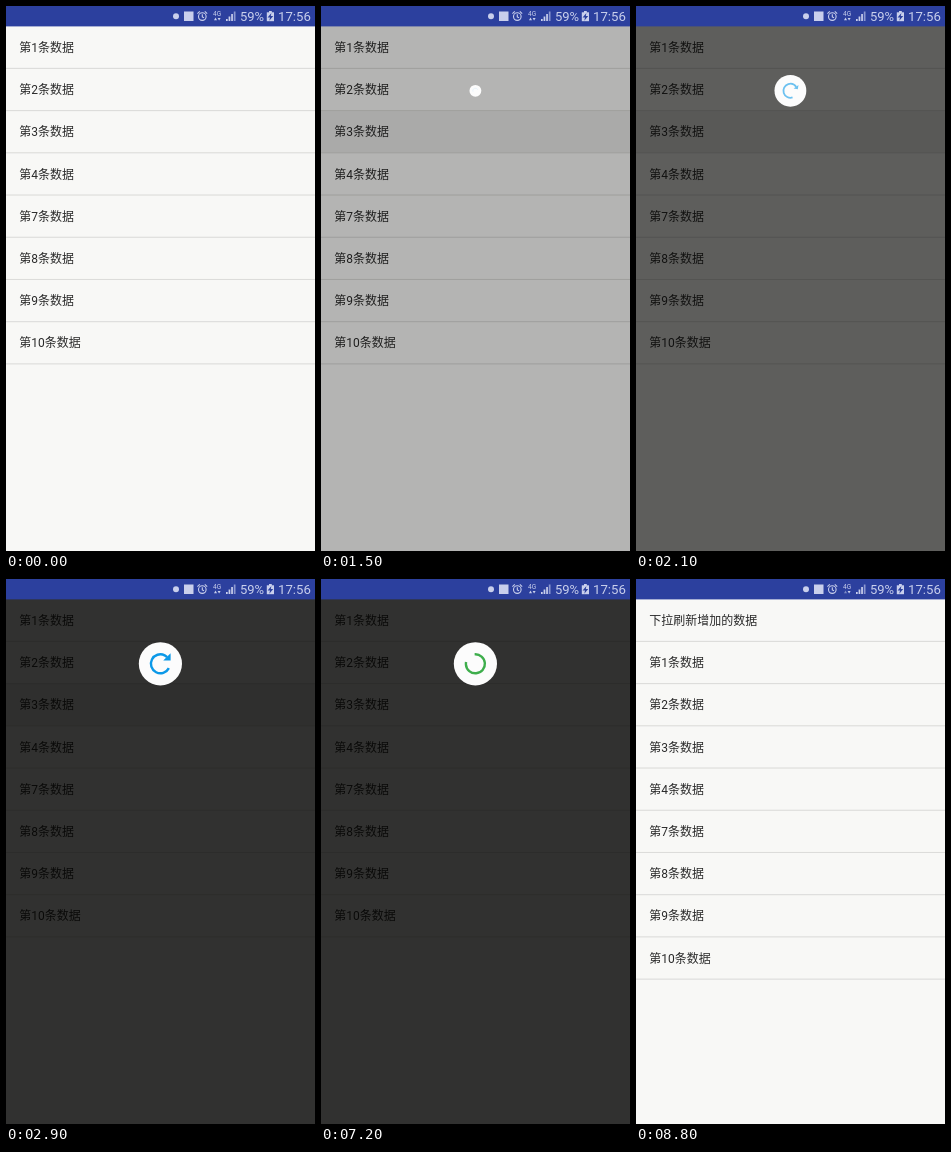
These frames come from a looping animation (309x545 px, 9200 ms). An HTML page with a canvas:

```html
<!DOCTYPE html>
<html lang="zh">
<head>
<meta charset="utf-8">
<style>
html, body { margin: 0; width: 100%; height: 100%; overflow: hidden; background: #f8f8f6; }
canvas { display: block; }
</style>
</head>
<body>
<canvas width="309" height="545"></canvas>
<script>
const ctx = document.querySelector('canvas').getContext('2d');
const LOOP = 9200, STEP = 100;
const BAR = 20.4, ROW = 42.22, TOP_ROW = 20.2;
const CX = 154.4, CY = 84.8, DISC = 21.6, RING = 9.5, STROKE = 2.4;
const SPIN_START = 3372, CYCLE = 1332, DISMISS = 7400, GONE = 8400;
const BLUE = [12, 153, 232], GREEN = [62, 174, 76];
const ICON = '#c9cfec', BAR_COLOR = '#2c409e';
const items = [1, 2, 3, 4, 7, 8, 9, 10].map(n => `第${n}条数据`);
const added = '下拉刷新增加的数据';
// Pull progress: time, amount
const pull = [[1200, 0], [1500, .34], [1700, .525], [2300, .9], [2800, 1]];

const clamp = v => Math.max(0, Math.min(1, v));
const mix = (a, b, k) => a + (b - a) * k;
const rad = deg => deg * Math.PI / 180;

function track(points, t) {
  for (let i = 1; i < points.length; i++) {
    const [t0, v0] = points[i - 1], [t1, v1] = points[i];
    if (t < t1) return mix(v0, v1, clamp((t - t0) / (t1 - t0)));
  }
  return points[points.length - 1][1];
}

// cubic-bezier(.4, 0, .2, 1)
function ease(x) {
  let lo = 0, hi = 1, s = .5;
  for (let i = 0; i < 14; i++) {
    s = (lo + hi) / 2;
    const at = 1.2 * (1 - s) ** 2 * s + .6 * (1 - s) * s * s + s ** 3;
    if (at < x) lo = s; else hi = s;
  }
  return 3 * (1 - s) * s * s + s ** 3;
}

function rect(color, x, y, w, h) {
  ctx.fillStyle = color;
  ctx.fillRect(x, y, w, h);
}

function circle(color, x, y, r) {
  ctx.fillStyle = color;
  ctx.beginPath();
  ctx.arc(x, y, r, 0, 7);
  ctx.fill();
}

function poly(color, ...pts) {
  ctx.fillStyle = color;
  ctx.beginPath();
  for (let i = 0; i < pts.length; i += 2) ctx.lineTo(pts[i], pts[i + 1]);
  ctx.fill();
}

function text(str, x, y, size, color) {
  ctx.font = `${size}px Roboto, "Noto Sans CJK SC", "Noto Sans CJK", sans-serif`;
  ctx.fillStyle = color;
  ctx.fillText(str, x, y);
}

function statusBar(t) {
  rect(BAR_COLOR, 0, 0, 309, BAR);
  if (t >= 4800 && t < 5300) {
    circle(ICON, 158, 8.5, 3.6);
    poly(ICON, 154.8, 10, 161.2, 10, 158, 15);
    circle(BAR_COLOR, 158, 8.5, 1.4);
  }
  circle(ICON, 170, 10.3, 3);
  rect(ICON, 178, 5.5, 9.5, 9.5);

  // alarm clock
  ctx.strokeStyle = ICON;
  ctx.lineWidth = 1.1;
  ctx.beginPath();
  ctx.arc(196.3, 10.6, 3.8, 0, 7);
  ctx.moveTo(196.3, 8.2);
  ctx.lineTo(196.3, 10.9);
  ctx.lineTo(198, 11.8);
  ctx.moveTo(191.4, 7.6);
  ctx.lineTo(193.8, 5.4);
  ctx.moveTo(198.8, 5.4);
  ctx.lineTo(201.2, 7.6);
  ctx.stroke();

  // mobile data
  text('4G', 207, 9.8, 6.5, ICON);
  poly(t >= 8800 ? '#7f8cc6' : ICON, 208, 14.2, 209.5, 11.6, 211, 14.2);
  poly(ICON, 211.6, 12, 214.6, 12, 213.1, 14.6);
  for (let i = 0; i < 4; i++) {
    const h = 2 + i * 2.5;
    rect(i < 3 ? ICON : '#8c98cf', 220 + i * 2.6, 15 - h, 1.7, h);
  }

  text('59%', 234, 14.8, 13, ICON);
  rect(ICON, 260.8, 6.3, 7.2, 8.9);
  rect(ICON, 263, 5, 2.8, 2);
  poly(BAR_COLOR, 265.4, 7, 261.6, 11.6, 264, 11.6, 263.3, 14.8, 267.2, 10, 264.8, 10);
  text('17:56', 272, 14.8, 13.2, ICON);
}

function list(t) {
  rect('#f8f8f6', 0, 0, 309, 545);
  const rows = t >= DISMISS ? [added, ...items] : items;
  if (t >= 1300 && t < 3100) rect('rgba(0,0,0,.055)', 0, TOP_ROW + 2 * ROW, 309, ROW);
  rows.forEach((label, i) => {
    const y = TOP_ROW + i * ROW;
    text(label, 13.3, y + 25.7, 12, '#2a2a2a');
    rect('#dcdcda', 0, y + ROW - .6, 309, 1.1);
  });
}

// Angles in degrees, colour and arrow size of the ring at a given time
function ringState(t, p) {
  if (t < SPIN_START) {
    return { tail: 27 + (1 - p) * 200, sweep: 288 * Math.sqrt(p), color: BLUE, alpha: p * p, arrow: p };
  }
  const sinceStart = t - SPIN_START;
  if (sinceStart < CYCLE / 2) {
    const u = sinceStart / (CYCLE / 2);
    const sweep = mix(288, 16, u);
    return { tail: mix(315, 608, u) - sweep, sweep, color: shade(0, u), alpha: 1, arrow: 1 };
  }
  const turns = (sinceStart - CYCLE / 2) / CYCLE, n = Math.floor(turns), u = turns - n;
  const head = ease(clamp(u * 2)), tail = ease(clamp(u * 2 - 1));
  return {
    tail: 232 + 378 * turns + 288 * (n + tail),
    sweep: 288 * (head - tail) + 10,
    color: shade(n + 1, u), alpha: 1, arrow: 0
  };
}

// Blue and green alternate, blending in the last quarter of each cycle
function shade(n, u) {
  const [from, to] = n % 2 ? [GREEN, BLUE] : [BLUE, GREEN];
  const k = clamp((u - .75) * 4);
  return from.map((v, i) => Math.round(mix(v, to[i], k)));
}

function disc(t, p, radius) {
  circle('#fcfcfc', CX, CY, radius);
  const { tail, sweep, color, alpha, arrow } = ringState(t, p);
  const css = `rgb(${color})`, scale = radius / DISC;
  ctx.save();
  ctx.translate(CX, CY);
  ctx.scale(scale, scale);
  ctx.globalAlpha = alpha;
  ctx.strokeStyle = css;
  ctx.lineWidth = STROKE;
  ctx.beginPath();
  ctx.arc(0, 0, RING, rad(tail), rad(tail + sweep));
  ctx.stroke();
  if (arrow) {
    ctx.rotate(rad(tail + sweep));
    ctx.translate(RING, 0);
    ctx.scale(arrow, arrow);
    poly(css, -5.2, -.3, 5.2, -.3, 0, 5);
  }
  ctx.restore();
}

function draw(t) {
  list(t);
  const p = track(pull, t);
  const closing = t >= DISMISS;
  const dim = closing ? clamp((8300 - t) / 950) : p;
  const radius = DISC * (closing ? (8420 - t) / 1020 : p ** 1.2);
  if (t >= 1600 && t < 1800) {
    circle('rgba(255,255,255,.04)', CX, 127, 16);
    circle('rgba(0,0,0,.1)', CX, 127.5, 12);
  }
  if (t >= 1300 && t < GONE) {
    rect(`rgba(2,2,0,${.805 * dim})`, 0, 0, 309, 545);
    disc(t, p, radius);
  }
  statusBar(t);
}

const start = performance.now();
function tick() {
  const t = (performance.now() - start) % LOOP;
  draw(Math.floor(t / STEP) * STEP);
  requestAnimationFrame(tick);
}
tick();
</script>
</body>
</html>
```
